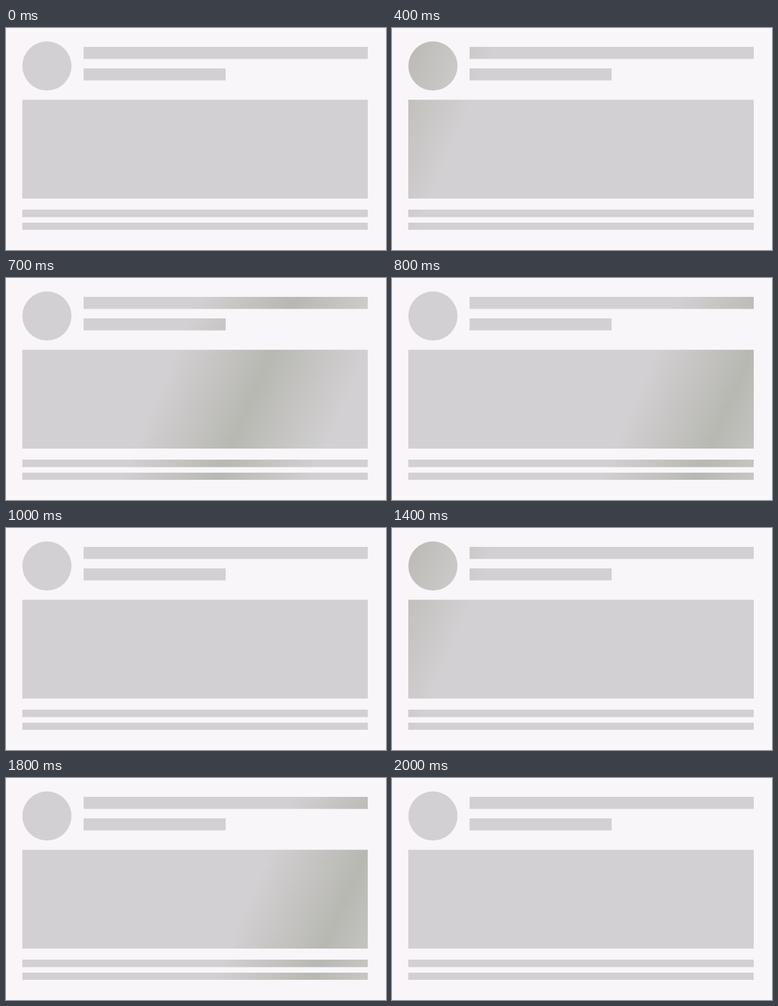
Recreate the animation shown at these times as an HTML page with a canvas. Size 583 by 341 pixels, loop 2.1 s.

```html
<!DOCTYPE html>
<html lang="en">
<head>
<meta charset="utf-8">
<title>Skeleton loader</title>
<style>
  html, body { margin: 0; height: 100%; overflow: hidden; background: #f8f6f9; }
  canvas { display: block; }
</style>
</head>
<body>
<canvas id="stage" width="583" height="341"></canvas>
<script>
const ctx = document.getElementById('stage').getContext('2d');
const LOOP = 2100, STEP = 100, SWEEP = 1000;
const BASE = '#d2d0d2', SHADE = '#b8b8b2';
const SLANT = 0.43;      // how far the band leans left per pixel down
const HALF_WIDTH = 147;  // horizontal distance from band centre to its edge
const SPEED = 1.44;      // px per ms

const shapes = new Path2D();
shapes.arc(62.8, 58.3, 37.7, 0, Math.PI * 2);
shapes.rect(119, 29, 436, 18.5);
shapes.rect(119, 62, 218, 18.5);
shapes.rect(25, 110.3, 530, 151.7);
shapes.rect(25, 279, 530, 11.5);
shapes.rect(25, 299, 530, 11);

// One shading band shared by all shapes, centred on centerX at the top edge.
function shimmer(centerX) {
  const dx = HALF_WIDTH / (1 + SLANT * SLANT), dy = dx * SLANT;
  const gradient = ctx.createLinearGradient(centerX - dx, -dy, centerX + dx, dy);
  gradient.addColorStop(0, BASE);
  gradient.addColorStop(0.5, SHADE);
  gradient.addColorStop(1, BASE);
  return gradient;
}

function draw() {
  const time = Math.floor(performance.now() % LOOP / STEP) * STEP;
  ctx.fillStyle = '#f8f6f9';
  ctx.fillRect(0, 0, 583, 341);
  ctx.fillStyle = shimmer(-552 + SPEED * (time % SWEEP));
  ctx.fill(shapes);
  requestAnimationFrame(draw);
}
draw();
</script>
</body>
</html>
```
